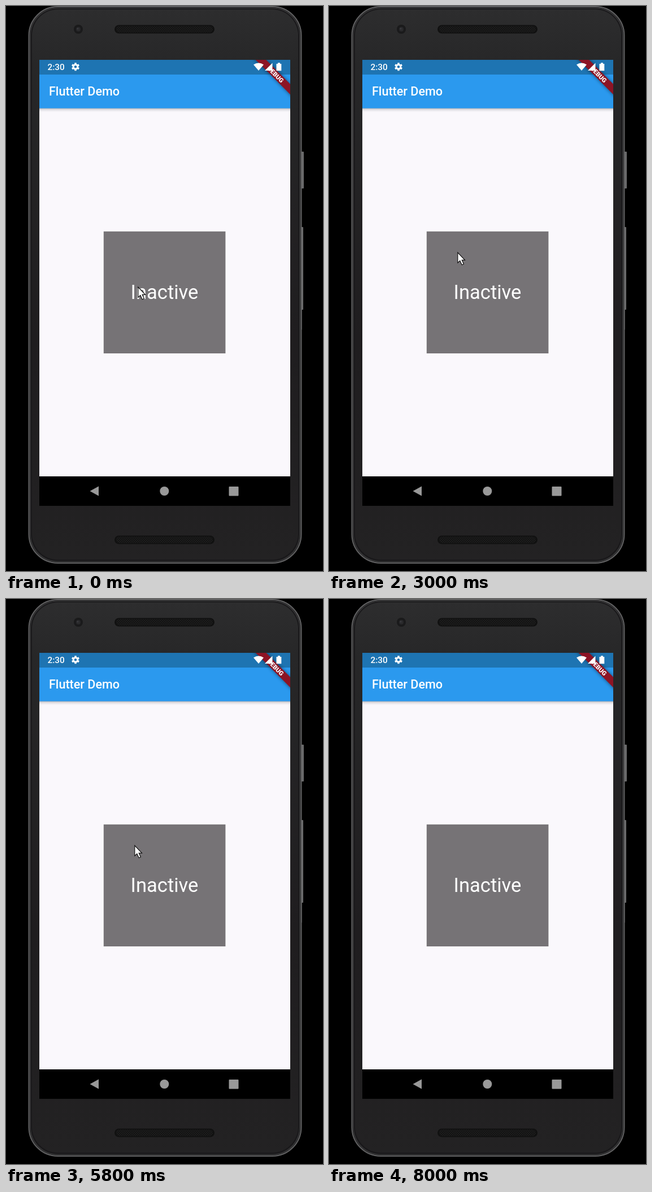
An HTML page that plays this animation: 561 px wide and 997 px high, repeating every 8100 ms.

```html
<!DOCTYPE html>
<html lang="en">
<head>
<meta charset="utf-8">
<title>Flutter Demo</title>
<style>
  html, body { margin: 0; width: 100%; height: 100%; overflow: hidden; background: #000; }
  svg { display: block; width: 100vw; height: 100vh; }
  text { font-family: Roboto, sans-serif; fill: #fff; }
  .label { font-size: 34.56px; text-anchor: middle; }
  .on, .cursor { animation: 8.1s step-end infinite; }
  .on { animation-name: toggle; }
  .cursor { animation-name: point; }

  @keyframes toggle {
    0%, 35.8%, 61.72%, 85.18% { visibility: hidden; }
    24.69%, 49.38%, 74.07% { visibility: visible; }
  }
  @keyframes point {
    0% { transform: translate(233px, 495px); }
    4.93% { transform: translate(207px, 393px); }
    11.11% { transform: translate(227px, 434px); visibility: visible; }
    86.41% { transform: translate(260px, 405px); }
    87.65% { transform: translate(370px, 320px); }
    88.88% { transform: translate(492px, 227px); }
    90.12% { transform: translate(548px, 186px); visibility: visible; }
    91.35%, 99.99% { transform: translate(570px, 170px); visibility: hidden; }
    100% { transform: translate(570px, 170px); visibility: hidden; }
  }
</style>
</head>
<body>
<svg viewBox="0 0 561 997" preserveAspectRatio="none">
  <defs>
    <linearGradient id="shell" x2="0" y2="1">
      <stop offset="0" stop-color="#2d2d2e"/>
      <stop offset=".1" stop-color="#272728"/>
      <stop offset=".6" stop-color="#1f1d1f"/>
      <stop offset="1" stop-color="#232223"/>
    </linearGradient>
    <linearGradient id="drop" x2="0" y2="1">
      <stop offset="0" stop-color="#000" stop-opacity=".3"/>
      <stop offset=".4" stop-color="#000" stop-opacity=".1"/>
      <stop offset="1" stop-color="#000" stop-opacity="0"/>
    </linearGradient>
    <pattern id="mesh" width="4" height="4" patternUnits="userSpaceOnUse">
      <rect width="4" height="4" fill="#121212"/>
      <circle cx="1" cy="1" r=".8" fill="#2b2b2b"/>
      <circle cx="3" cy="3" r=".8" fill="#2b2b2b"/>
    </pattern>
    <filter id="blur" x="-20%" y="-100%" width="140%" height="300%">
      <feGaussianBlur stdDeviation="3"/>
    </filter>
    <clipPath id="screen"><rect x="59" y="95" width="444" height="787"/></clipPath>
    <g id="speaker">
      <rect x="192" y="-7.5" width="177" height="15" rx="7.5" fill="#111"/>
      <rect x="195" y="-5.5" width="171" height="11" rx="5.5" fill="url(#mesh)"/>
    </g>
  </defs>

  <rect width="561" height="997"/>

  <!-- Phone -->
  <rect x="522" y="257" width="5" height="65" rx="1" fill="#6b6b6c"/>
  <rect x="521" y="390" width="5" height="146" rx="1" fill="#6b6b6c"/>
  <rect x="521" y="536" width="3" height="35" fill="#3c3c3d"/>
  <rect x="40.5" y="1" width="482" height="982" rx="51" fill="#19181a" stroke="#626263" stroke-width="2"/>
  <rect x="43" y="3.5" width="477" height="977" rx="48.5" fill="none" stroke="#343435" stroke-width="2"/>
  <rect x="46" y="6" width="471" height="971" rx="46" fill="url(#shell)"/>
  <circle cx="128" cy="41" r="8" fill="#1a1a1b"/>
  <circle cx="128" cy="41" r="4" fill="#29292b"/>
  <circle cx="127" cy="40" r="1.5" fill="#3a3a3e"/>
  <use href="#speaker" y="41"/>
  <use href="#speaker" y="942"/>

  <!-- App -->
  <g clip-path="url(#screen)">
    <rect x="59" y="95" width="444" height="787" fill="#faf8fc"/>
    <rect x="59" y="180" width="444" height="7" fill="url(#drop)"/>
    <rect x="59" y="120" width="444" height="60.5" fill="#2b99ee"/>
    <rect x="59" y="95" width="444" height="26" fill="#1e74b2"/>
    <text x="76" y="158.2" font-size="21.6" font-weight="500">Flutter Demo</text>

    <g transform="translate(503 95) rotate(45)">
      <rect x="-50" y="30.2" width="100" height="13" opacity=".5" filter="url(#blur)"/>
      <rect x="-50" y="30.2" width="100" height="13" fill="#8d1425"/>
    </g>

    <text x="73.5" y="113" font-size="15.3" font-weight="500">2:30</text>
    <g transform="translate(123 107.3)">
      <circle r="3.8" fill="none" stroke="#fff" stroke-width="3"/>
      <g stroke="#fff" stroke-width="3.4">
        <path id="teeth" d="M0-7V-4M0 4V7"/>
        <use href="#teeth" transform="rotate(60)"/>
        <use href="#teeth" transform="rotate(120)"/>
      </g>
    </g>
    <g fill="#fff">
      <path d="M438 103.6Q447 97.2 456 103.6L447 114Z"/>
      <path d="M458 114L471.500 100.500V114Z"/>
      <path d="M478.500 102H481V100.300H485V102H487.300V114.300H478.500Z"/>
    </g>
    <text transform="translate(503 95) rotate(45)" y="40.6" font-size="11" font-weight="900" text-anchor="middle">DEBUG</text>

    <rect x="59" y="830" width="444" height="52"/>
    <g fill="#999">
      <path d="M148.500 856L164 847.500V864.500Z"/>
      <circle cx="280.300" cy="856" r="8"/>
      <rect x="394.500" y="848" width="17" height="16.500" rx="1"/>
    </g>

    <rect x="172.800" y="397.800" width="215.600" height="215.200" fill="#767376"/>
    <text class="label" x="280.500" y="517.300">Inactive</text>
    <g class="on">
      <rect x="172.800" y="397.800" width="215.600" height="215.200" fill="#6ba83a"/>
      <text class="label" x="280.500" y="517.300">Active</text>
    </g>
  </g>

  <path class="cursor" d="M.8 1V19.200L4.800 15.600 8.200 22.800 11.400 21.300 8.200 14.400H13.500Z" fill="#fff" stroke="#111" stroke-width="1.200"/>
</svg>
</body>
</html>
```
